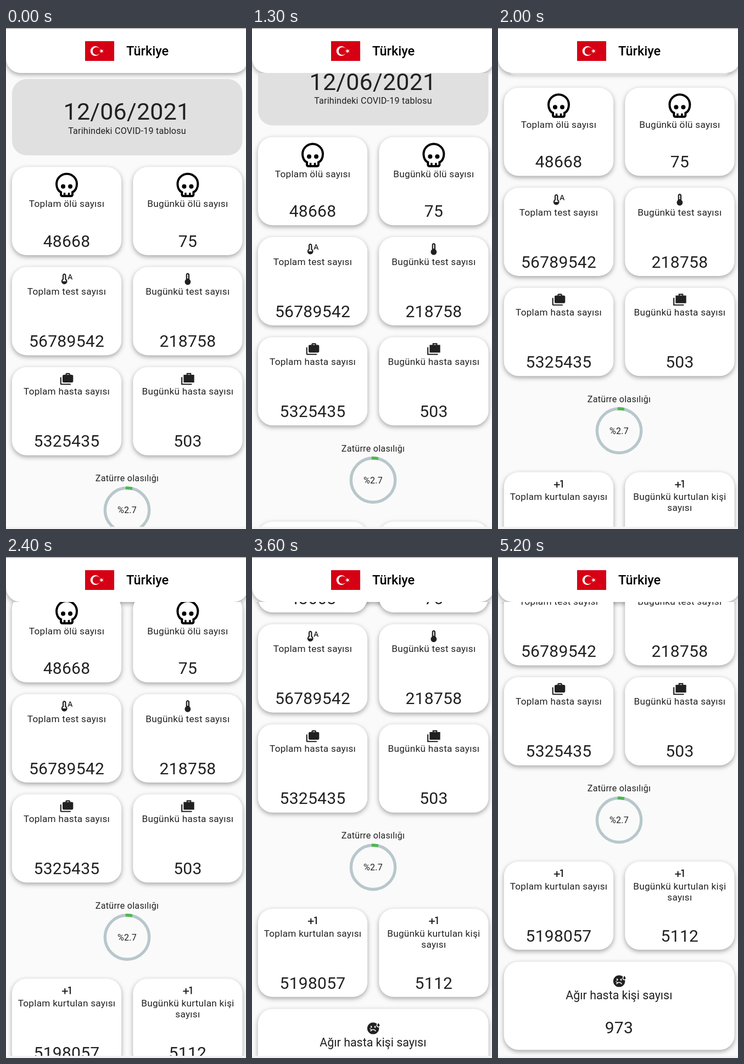
These frames come from a looping animation (437x913 px, 6.3 s). An HTML page:

```html
<!DOCTYPE html>
<html lang="tr">
<head>
<meta charset="utf-8">
<style>
  html, body { margin: 0; height: 100%; overflow: hidden; background: #fafafa; }
  svg { display: block; width: 100vw; height: 100vh; font-family: Roboto, sans-serif; }
  text { text-anchor: middle; fill: #212121; letter-spacing: .268px; }
  .label { font-size: 17.17px; }
  .number { font-size: 30.04px; }
  .small { font-size: 16.1px; }
  .card { fill: #fff; filter: drop-shadow(0 3px 4.5px rgba(0, 0, 0, .35)); }
  .icon { fill: #212121; fill-rule: evenodd; }
</style>
</head>
<body>
<svg viewBox="0 0 437 913">
  <defs>
    <clipPath id="view"><rect y="82" width="437" height="827"/></clipPath>
    <g id="skull" fill="none" stroke="#000" stroke-width="4">
      <path d="M-10.5 46C-16 44-18.5 37-18.5 31A18.5 18.5 0 0 1 18.5 31C18.5 37 16 44 10.5 46V50Q10.5 53 7.5 53H-7.5Q-10.5 53-10.5 50Z"/>
      <path d="M-4 47V53M4 47V53" stroke-width="3.5"/>
      <g fill="#000" stroke="none"><circle cx="-6.5" cy="35.5" r="4"/><circle cx="6.5" cy="35.5" r="4"/></g>
    </g>
  </defs>

  <rect width="437" height="913" fill="#fafafa"/>
  <rect class="card" y="-40" width="441" height="122" rx="26.8"/>
  <rect width="437" height="1.5" fill="#b0b0b0"/>
  <rect x="144" y="24" width="53" height="36" fill="#d60014"/>
  <circle cx="162.6" cy="42" r="8.9" fill="#fff"/>
  <circle cx="164.8" cy="42" r="7.1" fill="#d60014"/>
  <path id="star" fill="#fff"/>
  <text x="257.6" y="50" font-size="23.6" font-weight="500" style="fill:#000;letter-spacing:0">Türkiye</text>

  <g clip-path="url(#view)">
    <g id="list">
      <rect x="11" y="93" width="419.5" height="139" rx="26.8" fill="#e0e0e0"/>
      <text x="220" y="167.3" font-size="42.9">12/06/2021</text>
      <text x="220.5" y="192.8" class="small" style="letter-spacing:.22px">Tarihindeki COVID-19 tablosu</text>
      <g id="cards"></g>
      <text x="220.5" y="826" class="small">Zatürre olasılığı</text>
      <g fill="none" stroke-width="5.4" transform="rotate(-90 220.5 878.5)">
        <circle cx="220.5" cy="878.5" r="40.2" stroke="#b8c7cb"/>
        <circle cx="220.5" cy="878.5" r="40.2" stroke="#4db84e" pathLength="100" stroke-dasharray="2.7 200" stroke-linecap="square"/>
      </g>
      <text x="220.5" y="884" class="small">%2.7</text>
    </g>
  </g>
  <rect y="909" width="437" height="4" fill="#f2f2f2"/>
</svg>
<script>
const $ = id => document.getElementById(id);

// Icons on a 24-unit grid
const icons = {
  thermoAuto: 'M11 12V6c0-1.66-1.34-3-3-3S5 4.34 5 6v6c-1.21.91-2 2.37-2 4 0 2.76 2.24 5 5 5s5-2.24 5-5c0-1.63-.79-3.09-2-4zm-6 4c0-.94.45-1.84 1.2-2.4L7 13V6c0-.55.45-1 1-1s1 .45 1 1v7l.8.6c.75.56 1.2 1.46 1.2 2.4H5zM18.62 4h-1.61l-3.38 9h1.56l.8-2.24h3.63l.8 2.24h1.56zm-2.18 5.4 1.32-3.74h.11l1.32 3.74z',
  thermo: 'M15 13V5c0-1.66-1.34-3-3-3S9 3.34 9 5v8c-1.21.91-2 2.37-2 4 0 2.76 2.24 5 5 5s5-2.24 5-5c0-1.63-.79-3.09-2-4zm-4-8c0-.55.45-1 1-1s1 .45 1 1h-1v1h1v2h-1v1h1v2h-2z',
  casesRound: 'M2 9c-.55 0-1 .45-1 1v10c0 1.1.9 2 2 2h15c.55 0 1-.45 1-1s-.45-1-1-1H3V10c0-.55-.45-1-1-1zM18 5V4c0-1.1-.9-2-2-2h-4c-1.1 0-2 .9-2 2v1H7c-1.1 0-2 .9-2 2v9c0 1.1.9 2 2 2h14c1.1 0 2-.9 2-2V7c0-1.1-.9-2-2-2zm-6-1h4v1h-4z',
  cases: 'M3 9H1v13h18v-2H3zM18 5V2h-8v3H5v13h18V5zm-6-1h4v1h-4z',
  plusOne: 'M10 8H8v4H4v2h4v4h2v-4h4v-2h-4zm4.5-1.92V7.9l2.5-.5V18h2V5z',
  sick: 'M21 9c-1.1 0-2-.9-2-2s2-4 2-4 2 2.9 2 4-.9 2-2 2zm-3.5-2c0-.73.41-1.71.92-2.66C16.68 2.88 14.44 2 12 2 6.47 2 2 6.48 2 12s4.47 10 10 10 10-4.48 10-10c0-.55-.06-1.09-.14-1.62-.28.07-.56.12-.86.12-1.93 0-3.5-1.57-3.5-3.5zm-1.88.38 1.06 1.06-1.06 1.06 1.06 1.06-1.06 1.06-2.12-2.12zm-8.3 1.06 1.06-1.06 2.12 2.12-2.12 2.12-1.06-1.06L8.38 9.5zM8.56 17c.69-1.19 1.97-2 3.44-2s2.75.81 3.44 2h1.68c-.8-2.05-2.79-3.5-5.12-3.5-.87 0-1.7.2-2.43.57L5.99 12c-.25.43-.1.97.32 1.22l2.08 1.2c-.65.6-1.2 1.5-1.5 2.58z'
};

const text = (cls, x, y, s, attrs = '') => `<text class="${cls}" x="${x}" y="${y}" ${attrs}>${s}</text>`;
const icon = (name, x, y) =>
  `<path class="icon" d="${icons[name]}" transform="translate(${x - 12.88} ${y}) scale(1.073)"/>`;
const box = (x, y, w) => `<rect class="card" x="${x}" y="${y}" width="${w}" height="160.8" rx="26.8"/>`;

function card(right, y, name, label, value) {
  const x = right ? 231.2 : 10.8, mid = x + 99.7, skull = name === 'skull';
  const lines = label.split('|').map((s, i) => text('label', mid, y + (skull ? 73 : 50.5) + i * 20.1, s));
  return box(x, y, 199.4) + lines.join('') + text('number', mid, y + 145.5, value) +
    (skull ? `<use href="#skull" x="${mid}" y="${y}"/>` : icon(name, mid, y + 8.8));
}

$('cards').innerHTML = [
  [0, 253.2, 'skull', 'Toplam ölü sayısı', 48668],
  [1, 253.2, 'skull', 'Bugünkü ölü sayısı', 75],
  [0, 435.6, 'thermoAuto', 'Toplam test sayısı', 56789542],
  [1, 435.6, 'thermo', 'Bugünkü test sayısı', 218758],
  [0, 617.9, 'casesRound', 'Toplam hasta sayısı', 5325435],
  [1, 617.9, 'cases', 'Bugünkü hasta sayısı', 503],
  [0, 954, 'plusOne', 'Toplam kurtulan sayısı', 5198057],
  [1, 954, 'plusOne', 'Bugünkü kurtulan kişi|sayısı', 5112]
].map(c => card(...c)).join('') +
  box(10.8, 1136.4, 419.8) + icon('sick', 220.6, 1159) +
  text('', 220.4, 1204.5, 'Ağır hasta kişi sayısı', 'font-size="21.4" style="letter-spacing:0"') +
  text('number', 220.4, 1267, 973);

// Five-pointed star, one point to the left
$('star').setAttribute('d', 'M' + Array.from({ length: 10 }, (_, i) => {
  const r = i % 2 ? 1.68 : 4.4, a = Math.PI * (1 + i / 5);
  return `${174 + r * Math.cos(a)} ${42 + r * Math.sin(a)}`;
}).join('L') + 'Z');

// Scroll position: [time in ms, offset in px]
const scroll = [
  [0, 0], [700, 0], [800, 3], [900, 11], [1700, 98], [2100, 160], [2200, 174], [2300, 182],
  [2400, 185.5], [3000, 185.5], [3100, 198], [3600, 313], [3700, 328], [3800, 336], [3900, 339.5],
  [4100, 339.5], [4200, 340.5], [4400, 340.5], [4500, 343.5], [4600, 372], [4700, 372],
  [4800, 390], [4900, 390], [5000, 397.5], [5100, 397.5], [5200, 399], [6300, 399]
];

function offset(t) {
  const i = scroll.findIndex(k => k[0] > t);
  const [t0, a] = scroll[i - 1], [t1, b] = scroll[i];
  return a + (b - a) * (t - t0) / (t1 - t0);
}

// The picture advances in steps of 100 ms
function draw(now) {
  const t = Math.floor(now % 6300 / 100) * 100;
  $('list').setAttribute('transform', `translate(0 ${-offset(t)})`);
  requestAnimationFrame(draw);
}
draw(performance.now());
</script>
</body>
</html>
```
